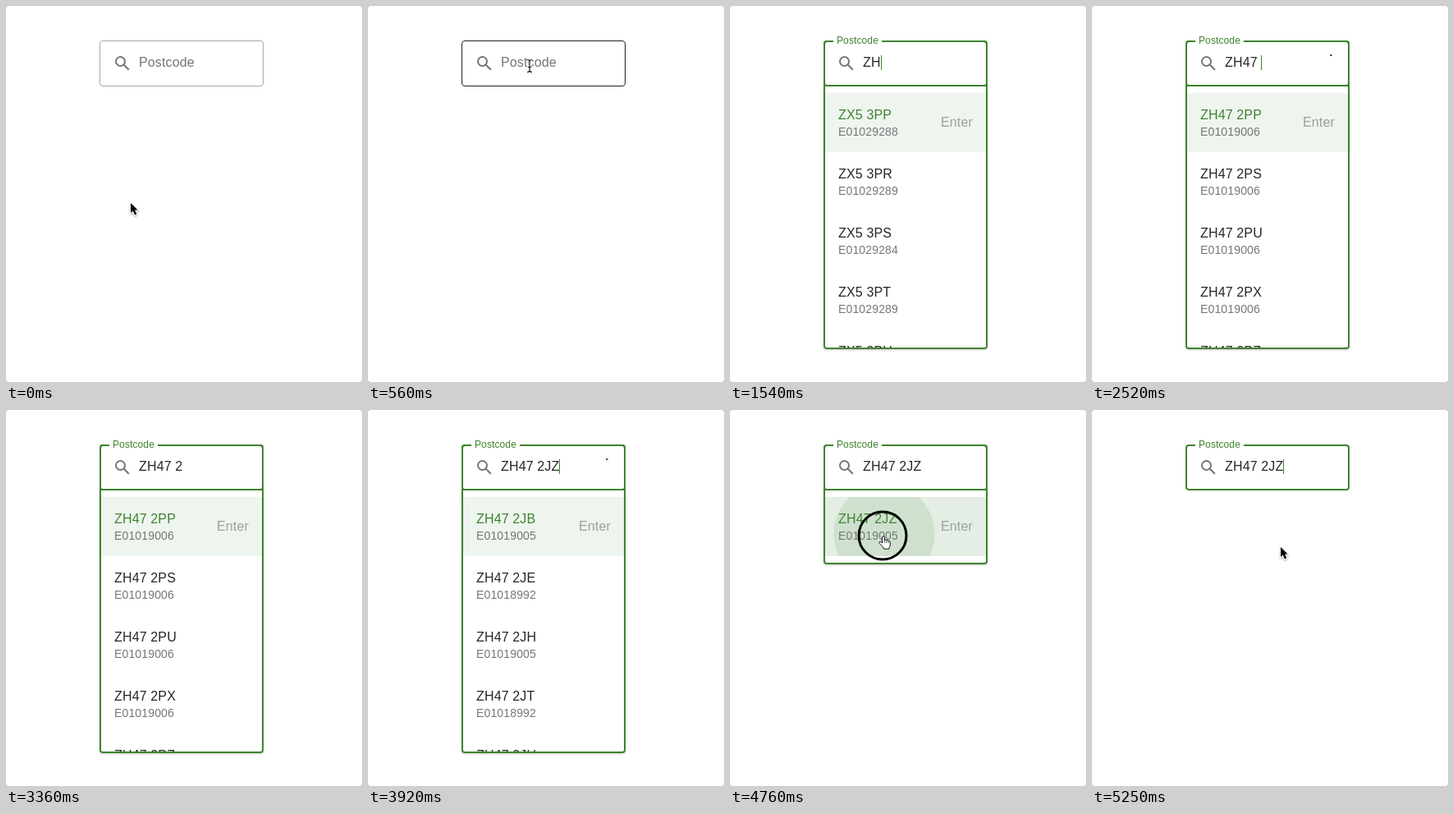
Write an HTML page that moves like this. It is 434 px wide and 458 px high and loops after 5320 ms.

```html
<!DOCTYPE html>
<html lang="en">
<head>
<meta charset="utf-8">
<title>Postcode search</title>
<style>
  html, body { margin: 0; width: 100%; height: 100%; overflow: hidden; background: #777; }
  svg { display: block; width: 434px; height: 458px; background: #fff; border-radius: 2px; }
  text { font: 16px "Liberation Sans", Arial, sans-serif; letter-spacing: .15px; white-space: pre; fill: #262626; }
  .code { font-size: 14px; fill: #777; }
  .hint { fill: #9aa19a; }
  .sheet { fill: #fff; filter: drop-shadow(0 1px 1px rgba(0, 0, 0, .22)); }
  .line { fill: none; stroke: #3f8330; stroke-width: 2; }
  .green { fill: #3f8330; }
</style>
</head>
<body>
<svg viewBox="0 0 434 458">
  <defs>
    <clipPath id="sheetClip"><rect id="clipBox" x="116" y="98" width="196" height="318"/></clipPath>
    <clipPath id="rowClip"><rect x="116" y="106" width="196" height="72"/></clipPath>
  </defs>

  <g id="menu">
    <rect id="sheet" class="sheet" x="114" y="94" width="200" rx="4"/>
    <g clip-path="url(#sheetClip)">
      <rect id="active" x="116" y="106" width="196" height="72"/>
      <g id="rows"></g>
      <text class="hint" x="257" y="147">Enter</text>
    </g>
    <g clip-path="url(#rowClip)"><circle id="ripple" class="green" cx="188" cy="151" opacity=".12"/></g>
    <rect id="frame" class="line" x="115" y="43" width="198" rx="3"/>
  </g>

  <rect id="idle" x="114.5" y="42.5" width="199" height="55" rx="3.5" fill="none"/>
  <rect id="focus" class="line" x="115" y="43" width="198" height="54" rx="3"/>
  <path id="split" class="line" d="M115 97H313"/>
  <rect id="notch" y="41" height="4" fill="#fff"/>
  <g transform="translate(130 58)" fill="none" stroke="#757575" stroke-width="2">
    <circle cx="9.5" cy="9.5" r="5.5"/>
    <path d="M13.6 13.6L19.8 19.8" stroke-width="2.1"/>
  </g>
  <text id="label">Postcode</text>
  <text id="value" x="162" y="74"></text>
  <rect id="caret" class="green" y="60" width="1" height="18"/>
  <rect id="spinner" x="290" y="59" width="2.5" height="2" fill="#555"/>

  <circle id="press" cx="186" cy="153" r="29" fill="none" stroke="#000" stroke-width="3"/>
  <g id="pointer">
    <path id="arrow" d="M0 1V13L2.8 10.4 5 15.4 7.3 14.4 5.1 9.4H8.6Z"
      stroke="#fff" stroke-width="2" paint-order="stroke" style="filter:drop-shadow(0 1px 1px rgba(0,0,0,.35))"/>
    <g id="beam" fill="none">
      <path d="M-3-7.5Q0-7.5 0-5.5Q0-7.5 3-7.5M0-5.5V5.5M-3 7.5Q0 7.5 0 5.5Q0 7.5 3 7.5M-2 1.5H2" stroke="#fff" stroke-width="3"/>
      <path d="M-3-7.5Q0-7.5 0-5.5Q0-7.5 3-7.5M0-5.5V5.5M-3 7.5Q0 7.5 0 5.5Q0 7.5 3 7.5M-2 1.5H2" stroke="#111" stroke-width="1.2"/>
    </g>
    <g id="hand" transform="translate(1 1)" fill="#fff" stroke="#111">
      <path d="M-1.5 8V1.2a1.4 1.4 0 0 1 2.8 0V5a1.3 1.3 0 0 1 2.6.3a1.3 1.3 0 0 1 2.4.5a1.2 1.2 0 0 1 2 1v3.2c0 2-1.3 2.8-1.5 5.2H.5C0 12.6-3 10.5-4.8 8.3c-.9-1.4.8-2.5 1.8-1.5z"/>
      <path d="M1.3 5V8M3.8 5.5V8M6.2 6V8.2" stroke-width=".7"/>
    </g>
  </g>
</svg>

<script>
const LOOP = 5320, TICK = 70;
const $ = id => document.getElementById(id);
const set = (id, attrs) => { for (const k in attrs) $(id).setAttribute(k, attrs[k]); };
const show = (id, on) => { $(id).style.display = on ? '' : 'none'; };
const mix = (a, b, p) => a + (b - a) * p;
const clamp = p => Math.min(1, Math.max(0, p));
const at = (table, t) => table.filter(step => step[0] <= t).pop();

// Each list: shared prefix, row endings, area codes
const lists = {
  first: ['ZX5 3P', 'PRSTU', ['E01029288', 'E01029289', 'E01029284', 'E01029289']],
  town: ['ZH4 1P', 'PSUXZ', ['E01018955', 'E01018955', 'E01018957', 'E01018955']],
  district: ['ZH47 2P', 'PSUXZ', Array(4).fill('E01019006')],
  sector: ['ZH47 2J', 'BEHTU', ['E01019005', 'E01018992', 'E01019005', 'E01018992']],
  match: ['ZH47 2J', 'Z', ['E01019005']]
};

const menuSteps = [[0, ''], [1470, 'first'], [1890, 'town'], [2380, 'district'],
  [3780, 'sector'], [3990, 'match'], [4830, '']];
// time, text, caret x
const typing = [[0, '', 162], [1260, 'Z', 172], [1540, 'ZH', 184], [1960, 'ZH4', 193],
  [2170, 'ZH47', 202], [2380, 'ZH47 ', 206], [2870, 'ZH47 2', 215],
  [3640, 'ZH47 2J', 223], [3850, 'ZH47 2JZ', 233]];
const caretSteps = [[0, 0], [770, 1], [3360, 0], [3640, 1], [4340, 0], [4830, 1]];
// start and end of each loading blip
const loading = [[1400, 1470], [1680, 1820], [2100, 2240], [2310, 2380],
  [2520, 2660], [3010, 3080], [3710, 3780], [3920, 3990]];
// start, end, from, to
const moves = [
  [140, 630, [152, 239], [200, 63]],
  [4130, 4620, [200, 63], [186, 153]],
  [5110, 5250, [185, 153], [230, 166]]
];

function pointerAt(t) {
  const move = moves.filter((m, i) => !i || t >= (i === 1 ? 4200 : 4830)).pop();
  const [start, end, from, to] = move;
  const p = clamp((t - start) / (end - start)), e = p * p * (3 - 2 * p);
  return [mix(from[0], to[0], e), mix(from[1], to[1], e)];
}

let current = null;
function drawMenu(name) {
  if (name === current) return;
  current = name;
  show('menu', name);
  show('split', name);
  if (!name) return;
  const [prefix, ends, codes] = lists[name];
  const bottom = name === 'match' ? 188 : 418;
  set('sheet', { height: bottom - 94 });
  set('frame', { height: bottom - 44 });
  set('clipBox', { height: bottom - 100 });
  $('rows').innerHTML = [...ends].map((end, i) =>
    `<text x="132" y="${138 + i * 72}"${i ? '' : ' class="green"'}>${prefix + end}</text>` +
    `<text class="code" x="132" y="${158 + i * 72}">${codes[i] || ''}</text>`).join('');
}

function render(t) {
  const focused = t >= 770;
  drawMenu(at(menuSteps, t)[1]);

  const [x, y] = pointerAt(t);
  const inField = y > 42 && y < 98;
  const onRow = current === 'match' && y > 106 && y < 178;
  show('pointer', t < 1260 || t >= 4200);
  show('arrow', !inField && !onRow);
  show('beam', inField);
  show('hand', onRow);
  set('pointer', { transform: `translate(${Math.round(x)} ${Math.round(y)})` });

  show('idle', !focused);
  show('focus', focused);
  set('idle', { stroke: inField ? '#212121' : '#a6a6a6' });

  const p = focused ? 1 - (1 - clamp((t - 740) / 200)) ** 3 : 0;
  set('label', { transform: `translate(${mix(162, 130, p)} ${mix(74, 46, p)}) scale(${mix(1, .75, p)})` });
  $('label').style.fill = `rgb(${mix(117, 63, p)}, ${mix(117, 131, p)}, ${mix(117, 48, p)})`;
  set('notch', { x: 126, width: 59 * p });

  const [, text, caretX] = at(typing, t);
  $('value').textContent = text;
  set('caret', { x: caretX });
  show('caret', at(caretSteps, t)[1]);
  show('spinner', loading.some(([a, b]) => t >= a && t < b));

  const pressed = t >= 4690 && t < 4830;
  show('press', pressed);
  show('ripple', pressed);
  set('ripple', { r: t < 4760 ? 40 : 61.5 });
  set('active', { fill: t < 4760 ? '#eef4ee' : '#e4eee4' });
}

function loop() {
  const t = performance.now() % LOOP;
  render(Math.floor(t / TICK) * TICK);
  requestAnimationFrame(loop);
}
loop();
</script>
</body>
</html>
```
